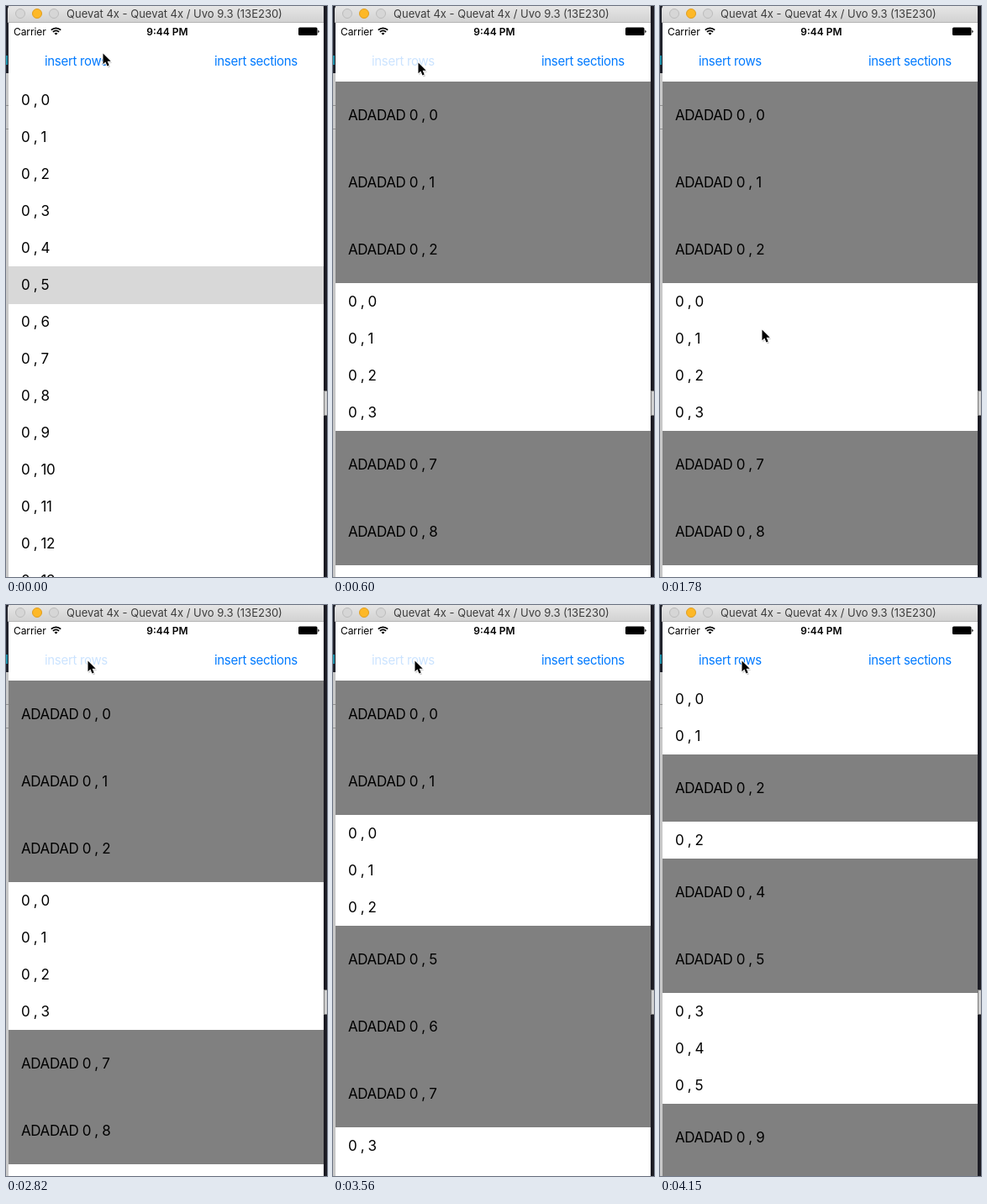
An HTML page for the animation above (8000 ms loop, 382 px wide and 680 px high).

```html
<!DOCTYPE html>
<html lang="en">
<head>
<meta charset="utf-8">
<title>Insert rows</title>
<style>
html, body { margin: 0; width: 100%; height: 100%; overflow: hidden; }
body { font-family: Inter, sans-serif; color: #000; background: #c8c8c8; }
#stage { position: relative; width: 382px; height: 680px; overflow: hidden; }
#stage div, #stage svg { position: absolute; }
#stage span { position: absolute; white-space: pre; }

.desk { left: 0; top: 0; width: 3px; height: 80px; background: #20222b; }
.glow { left: 0; top: 59px; width: 2px; height: 11px; background: #1b8fa8; }
.edge { left: 0; width: 3px; height: 1px; background: #8f8f8f; }
.side { left: 378px; top: 0; width: 4px; height: 680px; background: #1c1c24; }
.tab { left: 378px; top: 458px; width: 6px; height: 30px; background: #cfcfcf; border: 1px solid #777; box-sizing: border-box; }

.bar { left: 2px; top: 0; width: 376px; height: 20px; background: linear-gradient(#e6e6e6, #d2d2d2); border-bottom: 1px solid #b4b4b4; border-radius: 4px 4px 0 0; box-sizing: border-box; }
.dot { top: 3px; width: 12px; height: 12px; border-radius: 50%; background: #d6d6d6; border: 1px solid #bcbcbc; box-sizing: border-box; }
.dot.on { background: #fdb827; border-color: #e09e20; }
.title { left: 70px; top: 1px; font-size: 13px; line-height: 17px; color: #3c3c3c; }

.screen { left: 3px; top: 20px; width: 375px; height: 660px; background: #fff; overflow: hidden; }
.carrier { left: 6px; top: 3px; font-size: 12px; line-height: 15px; letter-spacing: -.1px; }
.clock { left: 0; width: 378px; top: 3px; text-align: center; font-size: 12px; line-height: 15px; font-weight: 600; }
.btn { top: 36px; font-size: 15px; line-height: 20px; letter-spacing: -.32px; color: #007aff; }

.list { left: 0; top: 70px; width: 375px; height: 590px; background: #fff; overflow: hidden; visibility: hidden; }
.row { left: 0; width: 375px; }
.row span { left: 15px; top: 0; font-size: 17px; letter-spacing: -.42px; }
.big { background: #808080; }
.picked { background: #d8d8d8; box-shadow: 0 1px #d8d8d8; z-index: 1; }

.btn.rows, .list, .cursor { animation: 8s step-end infinite; }
.btn.rows { animation-name: press; }
.list:nth-of-type(1) { animation-name: first; }
.list:nth-of-type(2) { animation-name: second; }
.list:nth-of-type(3) { animation-name: third; }
.list:nth-of-type(4) { animation-name: fourth; }
.cursor { left: 0; top: 0; animation-name: move; }

@keyframes press {
  0% { opacity: 1 }
  7.5% { opacity: .2 }
  9.375% { opacity: .36 }
  11.25% { opacity: .7 }
  13% { opacity: .94 }
  14.875% { opacity: 1 }
  35.25% { opacity: .2 }
  37.125% { opacity: .3 }
  38.875% { opacity: .7 }
  40.75% { opacity: 1 }
  44.5% { opacity: .2 }
  46.375% { opacity: .24 }
  48.125% { opacity: .5 }
  50% { opacity: .85 }
  51.875%, 100% { opacity: 1 }
}
@keyframes first { 0% { visibility: visible } 7.5%, 100% { visibility: hidden } }
@keyframes second { 0% { visibility: hidden } 7.5% { visibility: visible } 37.125%, 100% { visibility: hidden } }
@keyframes third { 0% { visibility: hidden } 37.125% { visibility: visible } 46.375%, 100% { visibility: hidden } }
@keyframes fourth { 0% { visibility: hidden } 46.375%, 100% { visibility: visible } }
@keyframes move {
  0% { transform: translate(116px, 57px) }
  1.875% { transform: translate(112px, 61px) }
  3.75% { transform: translate(105px, 66px) }
  5.625% { transform: translate(102px, 68px) }
  11.25% { transform: translate(106px, 78px) }
  13% { transform: translate(126px, 190px) }
  14.875% { transform: translate(140px, 336px) }
  16.625% { transform: translate(127px, 372px) }
  18.5% { transform: translate(115px, 387px) }
  22.25% { transform: translate(122px, 386px) }
  24.125% { transform: translate(121px, 310px) }
  26% { transform: translate(112px, 180px) }
  27.875% { transform: translate(101px, 92px) }
  29.75% { transform: translate(97px, 69px) }
  33.375%, 100% { transform: translate(98px, 67px) }
}
</style>
</head>
<body>
<div id="stage">
  <div class="desk"></div>
  <div class="glow"></div>
  <div class="edge" style="top:118px"></div>
  <div class="edge" style="top:146px"></div>
  <div class="side"></div>
  <div class="tab"></div>
  <div class="bar">
    <div class="dot" style="left:9px"></div>
    <div class="dot on" style="left:29px"></div>
    <div class="dot" style="left:49px"></div>
    <span class="title">Quevat 4x - Quevat 4x / Uvo 9.3 (13E230)</span>
  </div>
  <div class="screen">
    <section id="lists"></section>
    <span class="carrier">Carrier</span>
    <svg style="left:50px;top:5px" width="13" height="10" fill="none" stroke="#000" stroke-width="1.7">
      <path d="M.8 3.7a8 8 0 0 1 11.4 0M2.9 5.9a5 5 0 0 1 7.2 0"/>
      <path d="M6.5 9.6L4.5 7.7a2.8 2.8 0 0 1 4 0z" fill="#000" stroke="none"/>
    </svg>
    <span class="clock">9:44 PM</span>
    <svg style="left:345px;top:5px" width="26" height="11">
      <rect y=".5" width="22.5" height="9.5" rx="1.5"/>
      <path d="M23.3 3.4a1.9 1.9 0 0 1 0 3.6z"/>
    </svg>
    <span class="btn rows" style="left:43px">insert rows</span>
    <span class="btn" style="left:245px">insert sections</span>
  </div>
  <svg class="cursor" width="18" height="26" overflow="visible">
    <g transform="translate(-.5 -.5) scale(.88)">
      <path d="M1 2v15l3.6-3.3 2.5 5.6 2.6-1.1-2.5-5.5h5z" opacity=".2"/>
      <path d="M0 0v14.6l3.3-3.1 2.4 5.5 2.5-1.1-2.4-5.3h4.7z" stroke="#fff" stroke-width="1.6" paint-order="stroke"/>
    </g>
  </svg>
</div>
<script>
// "s" is a plain row, "p" a highlighted one, "B" a tall inserted row.
const layouts = ["ssssspssssssss", "BBBssssBBs", "BBsssBBBss", "ssBsBBsssBB"];
const box = document.getElementById("lists");

function addRow(list, kind, y, text) {
  const row = document.createElement("div");
  const label = document.createElement("span");
  const height = kind === "B" ? 80 : 44;
  row.className = "row" + ({ B: " big", p: " picked" }[kind] || "");
  row.style.top = y + "px";
  row.style.height = label.style.lineHeight = height + "px";
  label.textContent = text;
  row.append(label);
  list.append(row);
  return y + height;
}

for (const layout of layouts) {
  const list = document.createElement("div");
  let y = 0, plain = 0;
  list.className = "list";
  [...layout].forEach((kind, i) => {
    const text = kind === "B" ? `ADADAD 0 , ${i}` : `0 , ${plain++}`;
    y = addRow(list, kind, y, text);
  });
  box.append(list);
}
</script>
</body>
</html>
```
